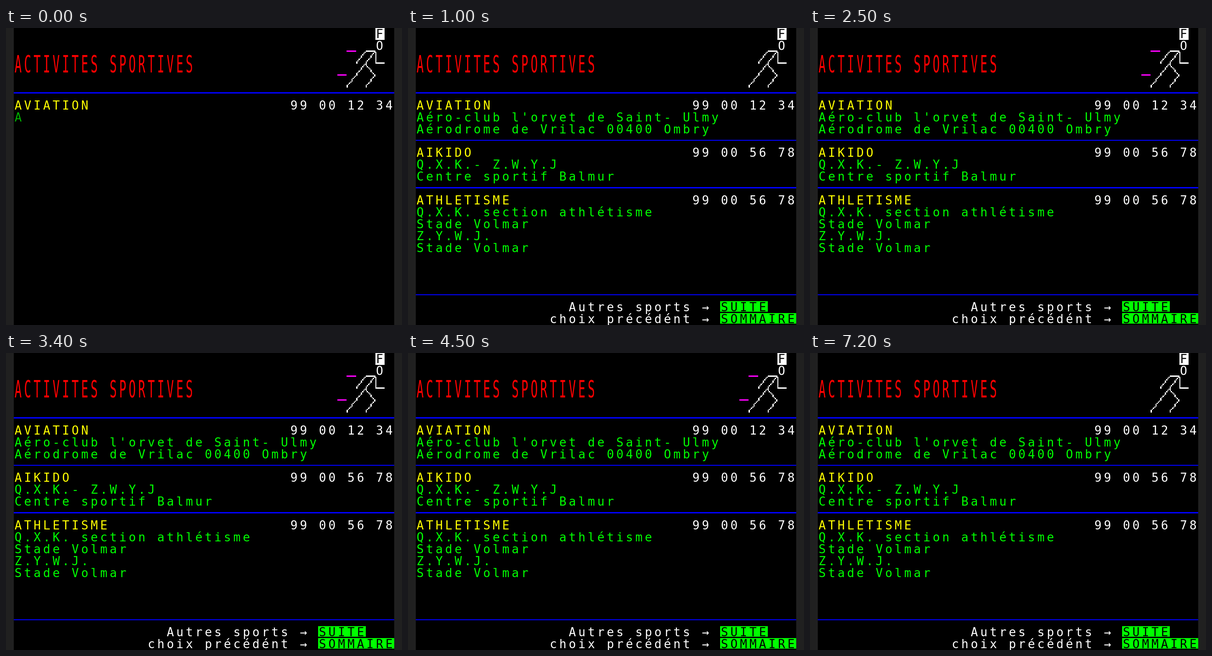
These frames come from a looping animation (864x648 px, 8 s). An HTML page:

```html
<!DOCTYPE html>
<html lang="fr">
<meta charset="utf-8">
<title>Activités sportives</title>
<style>
  html, body { margin: 0; width: 100%; height: 100%; overflow: hidden; background: #000; }
  svg { display: block; width: 864px; height: 648px; }
  text { font: 26px "DejaVu Sans Mono", monospace; text-anchor: middle; }
  rect { shape-rendering: crispEdges; }
</style>
<svg viewBox="0 0 864 648">
  <rect width="864" height="648" fill="#202020"/>
  <rect x="17" width="830" height="648"/>
  <g id="base"></g>
  <g id="cursor"></g>
  <g id="page"></g>
  <g id="speed"></g>
</svg>
<script>
const LEFT = 17, CW = 20.75, CH = 25.92;   // 40 x 25 character grid
const PW = CW / 8, PH = CH / 10;           // one dot of a cell
const BLUE = '#00f', GREEN = '#0f0', YELLOW = '#ff0', WHITE = '#fff', MAGENTA = '#f0f';
const $ = id => document.getElementById(id);

function add(group, tag, attrs, content = '') {
  const el = document.createElementNS('http://www.w3.org/2000/svg', tag);
  for (const key in attrs) el.setAttribute(key, attrs[key]);
  el.textContent = content;
  $(group).append(el);
}

// Places each character on the grid; tall text spans two rows.
function write(group, col, row, str, fill, tall = false) {
  const x = [...str].map((_, i) => (LEFT + (col + i + 0.46) * CW).toFixed(2)).join(' ');
  const y = row * CH + (tall ? 45.2 : 22.2);
  const attrs = { x, y, fill };
  if (tall) {
    attrs.y = 0;
    attrs.transform = `translate(0 ${y}) scale(1 2)`;
    attrs.style = 'font-size:25.5px';
  }
  add(group, 'text', attrs, str);
}

// Fills a box measured in dots inside a cell.
function dots(group, col, row, x, y, w, h, fill) {
  add(group, 'rect', {
    x: LEFT + col * CW + x * PW, y: row * CH + y * PH,
    width: w * PW, height: h * PH, fill
  });
}

const rule = (group, row) => dots(group, 0, row, 0, 4, 320, 1, BLUE);
const underscore = (group, col, row, fill) => dots(group, col, row, 0, 9, 8, 1, fill);

function diagonal(col, row, rising) {
  for (let i = 0; i < 10; i++) {
    dots('base', col, row, Math.floor((rising ? 9 - i : i) * 0.8), i, 1, 1, WHITE);
  }
}

function button(row, label) {
  dots('page', 32, row, 0, 0, label.length * 8, 9, GREEN);
  write('page', 32, row, label, '#000');
}

// Header and runner
write('base', 0, 2, 'ACTIVITES SPORTIVES', '#f00', true);
rule('base', 5);
dots('base', 38, 0, 0, 0, 8, 10, WHITE);
write('base', 38, 0, 'F', '#000');
write('base', 38, 1, 'O', WHITE);
underscore('base', 37, 1, WHITE);
dots('base', 38, 2, 0, 0, 1, 10, WHITE);
underscore('base', 38, 2, WHITE);
[[36, 2], [37, 2], [36, 3], [35, 4], [37, 4]].forEach(([c, r]) => diagonal(c, r, true));
diagonal(37, 3, false);
underscore('speed', 35, 1, MAGENTA);
underscore('speed', 34, 3, MAGENTA);

// Listings
const entries = [
  [6, 'AVIATION', '99 00 12 34', "Aéro-club l'orvet de Saint- Ulmy", 'Aérodrome de Vrilac 00400 Ombry'],
  [10, 'AIKIDO', '99 00 56 78', 'Q.X.K.- Z.W.Y.J', 'Centre sportif Balmur'],
  [14, 'ATHLETISME', '99 00 56 78', 'Q.X.K. section athlétisme', 'Stade Volmar', 'Z.Y.W.J.', 'Stade Volmar']
];
entries.forEach(([row, sport, phone, ...lines], i) => {
  const group = i ? 'page' : 'base';
  write(group, 0, row, sport, YELLOW);
  write(group, 29, row, phone, WHITE);
  lines.forEach((line, j) => write('page', 0, row + 1 + j, line, GREEN));
});
write('cursor', 0, 7, 'A', '#00b000');

// Footer
[9, 13, 22].forEach(row => rule('page', row));
write('page', 16, 23, 'Autres sports →', WHITE);
write('page', 14, 24, 'choix précédént →', WHITE);
button(23, 'SUITE');
button(24, 'SOMMAIRE');

const show = (id, on) => $(id).setAttribute('visibility', on ? 'visible' : 'hidden');
const blinks = [1000, 2500, 4000, 4500, 6000];

function frame(now) {
  const t = now % 8000;
  show('page', t >= 500);
  show('cursor', t < 500);
  show('speed', blinks.filter(b => t >= b).length % 2 === 0);
  requestAnimationFrame(frame);
}
frame(performance.now());
</script>
</html>
```
